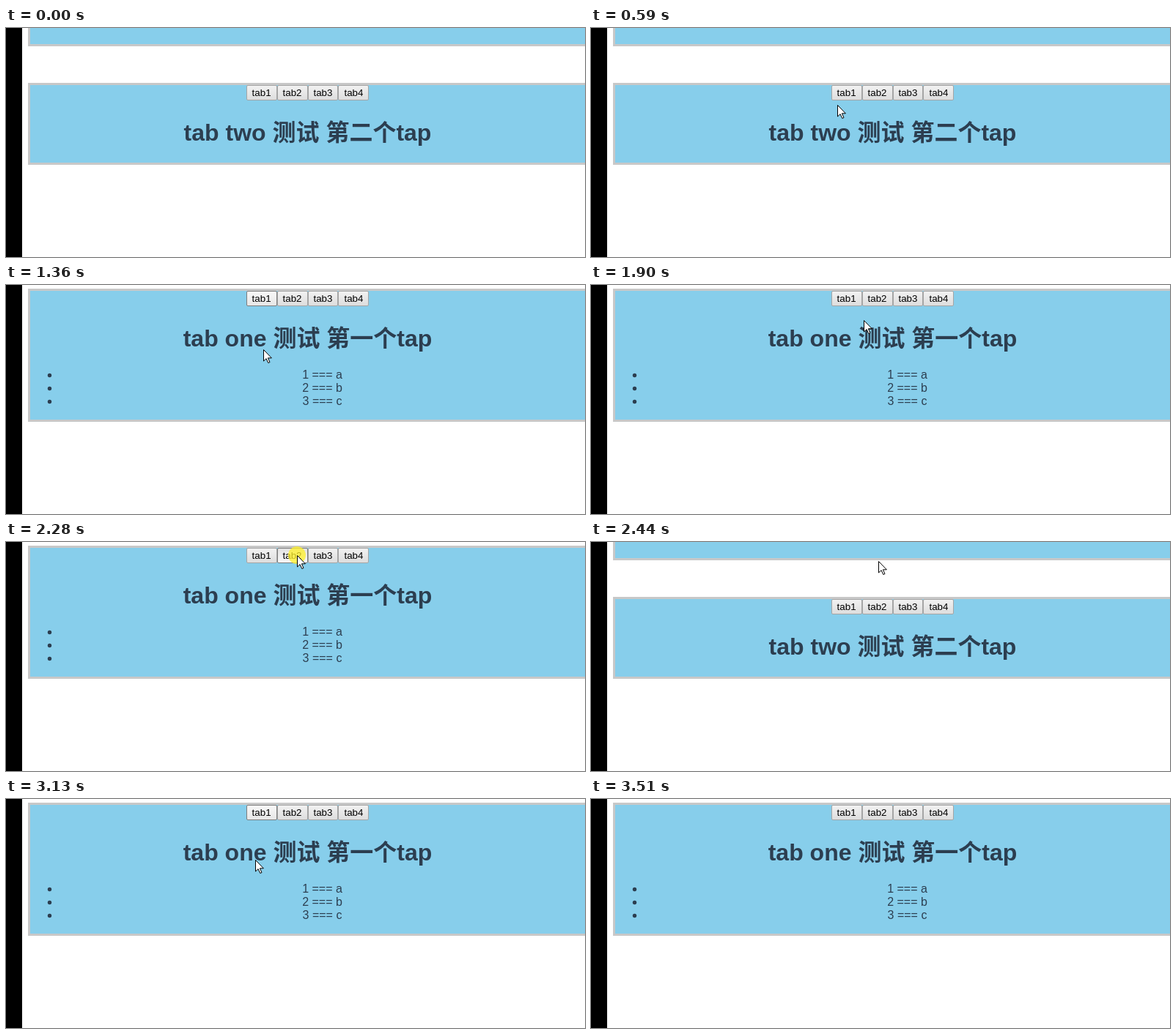
An HTML page for the animation above (3.98 s loop, 790 by 313 pixels).

```html
<!DOCTYPE html>
<html lang="zh-CN">
<head>
<meta charset="utf-8">
<title>Tabs</title>
<style>
  html, body { margin: 0; width: 100%; height: 100%; overflow: hidden; background: #fff; }
  svg { display: block; font-family: "Liberation Sans", Arial, "Noto Sans CJK SC", "Noto Sans CJK", sans-serif; }
  text { text-anchor: middle; fill: #2c3e50; }
  .panel { fill: skyblue; stroke: #c8c8c8; stroke-width: 3; }
  #heading { font-size: 32px; font-weight: bold; }
  #list { font-size: 16px; fill: #2c3e50; }
  .tab rect { fill: url(#normal); stroke: #a5a5a5; }
  .tab text { font-size: 13.333px; fill: #000; }
  .hover rect { fill: url(#lit); stroke: #7d7d7d; }
  .pressed rect { fill: url(#down); stroke: #7d7d7d; }
</style>
</head>
<body>
<svg width="790" height="313" viewBox="0 0 790 313">
  <defs>
    <linearGradient id="normal" x2="0" y2="1"><stop stop-color="#f2f2f2"/><stop offset="1" stop-color="#ddd"/></linearGradient>
    <linearGradient id="lit" x2="0" y2="1"><stop stop-color="#f8f8f8"/><stop offset="1" stop-color="#e6e6e6"/></linearGradient>
    <linearGradient id="down" x2="0" y2="1"><stop stop-color="#e2e2e2"/><stop offset="1" stop-color="#f8f8f8"/></linearGradient>
  </defs>
  <rect width="22" height="313"/>
  <g id="page">
    <rect class="panel" x="31.5" y="-151.5" width="800" height="100"/>
    <rect class="panel" id="panel" x="31.5" y="1.5" width="800"/>
    <g id="tabs"></g>
    <text id="heading" x="411.5" y="79"></text>
    <g id="list"></g>
  </g>
  <circle id="halo" r="12" fill="#fff02a" opacity=".76"/>
  <path id="cursor" d="M.5.5v15.5l3.6-3.4 2.7 5.9 2.2-1-2.6-5.7h5z" fill="#fff" stroke="#000"/>
</svg>
<script>
const $ = id => document.getElementById(id);
const LOOP = 3980, PANEL_BOTTOM = 187;
const views = [
  { top: 5, heading: 'tab one 测试 第一个tap' },
  { top: 75, heading: 'tab two 测试 第二个tap' }
];

const clicks = [
  { tab: 0, enter: 820, press: 1210, release: 1360, leave: 1440 },
  { tab: 1, enter: 2050, press: 2280, release: 2360, leave: 2430 },
  { tab: 0, enter: 2820, press: 2980, release: 3130, leave: 3210 }
];

const linear = p => p;
const easeIn = p => p * p;
const easeOut = p => 1 - (1 - p) ** 2;
const smooth = p => p * p * (3 - 2 * p);

const moves = [
  { start: 70, end: 590, steps: 8, from: [681, 269], to: [336, 105], ease: easeOut },
  { start: 670, end: 980, steps: 5, from: [338, 103], to: [351, 88], ease: easeOut },
  { start: 1440, end: 1440, steps: 1, from: [350, 78], to: [350, 78], ease: linear },
  { start: 1820, end: 2130, steps: 5, from: [352, 72], to: [397, 18], ease: easeOut },
  { start: 2430, end: 2740, steps: 5, from: [392, 26], to: [324, 80], ease: smooth },
  { start: 2820, end: 2900, steps: 2, from: [333, 82], to: [340, 83], ease: linear },
  { start: 3210, end: 3510, steps: 5, from: [344, 95], to: [410, 320], ease: easeIn }
];

$('tabs').innerHTML = [328, 370, 412, 453].map((x, i) => `
  <g class="tab">
    <rect x="${x + .5}" y="3.5" width="${i === 2 ? 40 : 41}" height="20" rx="1.5"/>
    <text x="${348.6 + i * 41.94}" y="18">tab${i + 1}</text>
  </g>`).join('');
const tabs = [...document.querySelectorAll('.tab')];

$('list').innerHTML = ['a', 'b', 'c'].map((letter, i) => `
  <circle cx="59.5" cy="${118.5 + i * 18}" r="2.7"/>
  <text x="431.5" y="${123 + i * 18}">${i + 1} === ${letter}</text>`).join('');

const show = (el, on) => el.setAttribute('visibility', on ? 'visible' : 'hidden');
const place = (el, [x, y]) => el.setAttribute('transform', `translate(${x} ${y})`);

function pointerAt(t) {
  const move = moves.findLast(m => t >= m.start);
  if (!move) return null;
  const { start, end, steps, from, to, ease } = move;
  const last = steps - 1;
  const step = t >= end ? last : Math.floor((t - start) / (end - start) * last + 1e-6);
  const p = last ? ease(step / last) : 1;
  return from.map((v, i) => Math.round(v + (to[i] - v) * p));
}

function render(t) {
  const selected = clicks.findLast(c => t >= c.release)?.tab ?? 1;
  const active = clicks.find(c => t >= c.enter && t < c.leave);
  const pressed = !!active && t >= active.press && t < active.release;
  const { top, heading } = views[selected];

  place($('page'), [0, top]);
  $('panel').setAttribute('height', PANEL_BOTTOM - top - 3);
  $('heading').textContent = heading;
  show($('list'), selected === 0);
  tabs.forEach((tab, i) => {
    const state = active?.tab === i ? (pressed ? ' pressed' : ' hover') : '';
    tab.setAttribute('class', 'tab' + state);
  });

  const pointer = pointerAt(t);
  show($('cursor'), pointer);
  show($('halo'), pressed);
  if (pointer) {
    place($('cursor'), pointer);
    place($('halo'), pointer);
  }
}

const began = performance.now();
function tick() {
  render((performance.now() - began) % LOOP);
  requestAnimationFrame(tick);
}
tick();
</script>
</body>
</html>
```
